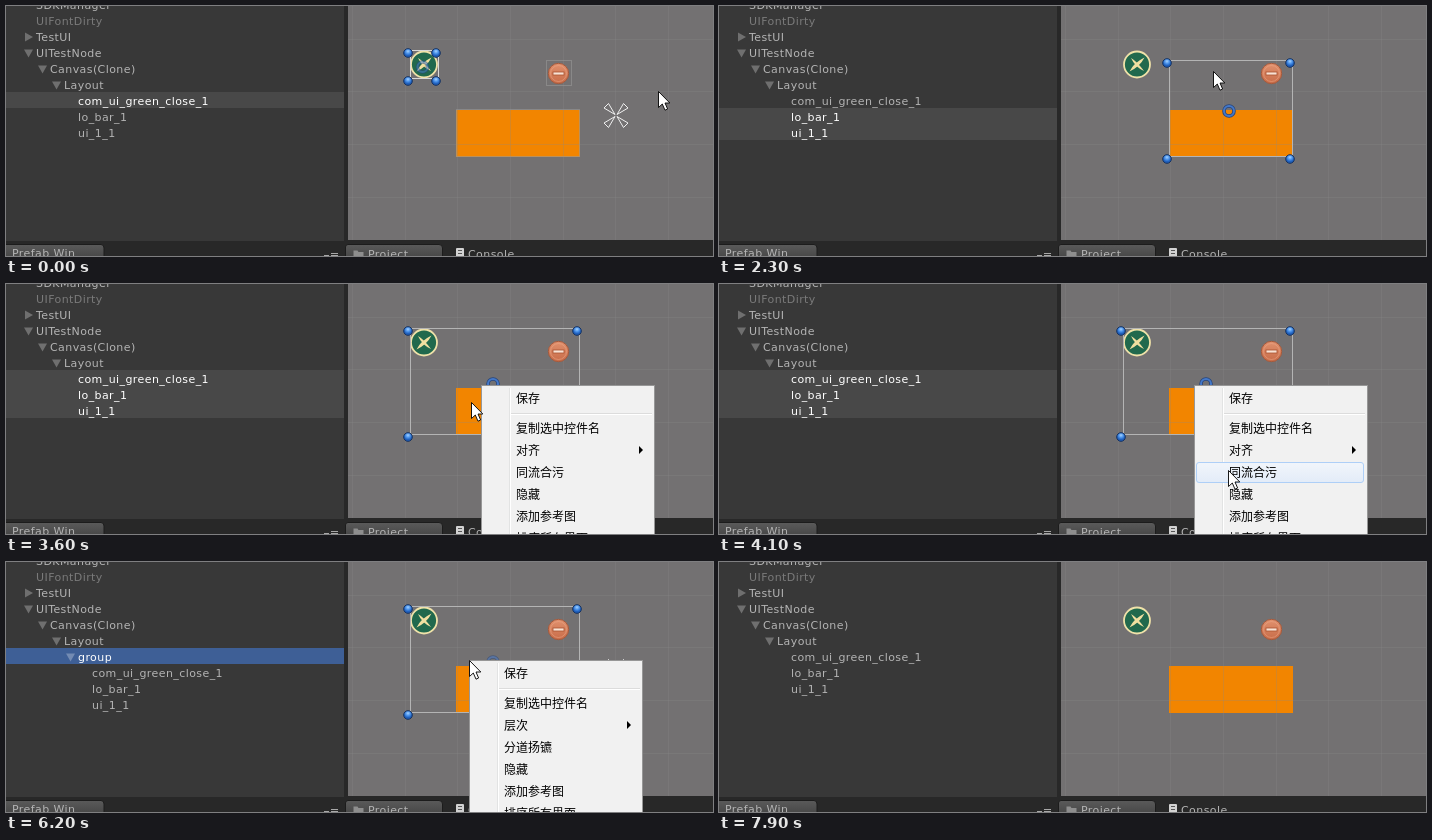
Write an HTML page that moves like this. It is 707 by 250 pixels and loops after 8800 ms.

```html
<!DOCTYPE html>
<html lang="zh">
<head>
<meta charset="utf-8">
<title>Grouping UI nodes</title>
<style>
html, body { margin: 0; width: 100%; height: 100%; overflow: hidden; background: #282828; }
svg { display: block; }
text { font: 11px "DejaVu Sans", sans-serif; letter-spacing: .42px; fill: #b4b4b4; white-space: pre; }
text.menu { font: 12px "Noto Sans CJK SC", "Noto Sans CJK", sans-serif; letter-spacing: 0; fill: #000; }
</style>
</head>
<body>
<svg id="stage" width="707" height="250" viewBox="0 0 707 250">
  <defs>
    <linearGradient id="tab" x2="0" y2="1"><stop stop-color="#5a5a5a"/><stop offset="1" stop-color="#484848"/></linearGradient>
    <linearGradient id="hover" x2="0" y2="1"><stop stop-color="#f1f5fb"/><stop offset="1" stop-color="#e3ecf8"/></linearGradient>
    <radialGradient id="knob" cy=".3"><stop stop-color="#a4d2ff"/><stop offset=".55" stop-color="#4a92ea"/><stop offset="1" stop-color="#2060bc"/></radialGradient>
    <linearGradient id="copper" x2="0" y2="1"><stop stop-color="#e1916e"/><stop offset="1" stop-color="#c86c48"/></linearGradient>
  </defs>
  <rect width="338" height="235" fill="#383838"/>
  <g id="tree"></g>
  <rect x="342" width="365" height="234" fill="#737172"/>
  <rect x="450" y="104" width="124" height="47" fill="#f28500"/>
  <path id="grid" fill="none" stroke="#8a8a8a" stroke-opacity=".27"/>
  <g transform="translate(418 58.5)">
    <circle r="13" fill="#21694d" stroke="#efe2a9" stroke-width="1.8"/>
    <path d="M-6-6.5Q0-3 7 6.5Q-2 2.5-6-6.5ZM7.5-7Q3 2-7.5 7Q-3-2 7.5-7Z" fill="#f0dfa0"/>
  </g>
  <g transform="translate(552.5 67.5)">
    <circle r="10.2" fill="url(#copper)" stroke="#a65a3c"/>
    <circle r="8" fill="none" stroke="#eda98a" stroke-opacity=".5"/>
    <rect x="-5.5" y="-1.5" width="11" height="3" fill="#f8e2d4" stroke="#a9502f" stroke-width=".8"/>
  </g>
  <g id="gizmo"></g>
  <g>
    <rect y="235" width="707" height="15" fill="#282828"/>
    <rect x="338" width="4" height="238" fill="#282828"/>
    <path d="M-2 251V238.5H95Q98 238.5 98 242V251M339.5 251V241Q339.5 238.5 342 238.5H433Q436.5 238.5 436.5 242V251" fill="url(#tab)" stroke="#1c1c1c"/>
    <text x="6" y="251">Prefab Win</text>
    <path d="M318 249.5h5M325 247.5h7M325 249.5h7" stroke="#a8a8a8"/>
    <path d="M347.5 251V244.5h4l1 1.5h5V251Z" fill="#8e8e8e"/>
    <text x="362" y="252">Project</text>
    <rect x="450" y="242" width="8" height="9" rx="1" fill="#d2d2d2"/>
    <path d="M452 244.5h4M452 247.5h4" stroke="#555"/>
    <text x="462" y="252">Console</text>
  </g>
  <g id="popup"></g>
  <path id="cursor" d="M.5.5V16.5L4.3 13L7 19.2L9.6 18L7 12H11.8Z" fill="#fff" stroke="#000" stroke-width=".9"/>
</svg>
<script>
const LOOP = 8800, STEP = 100;
const el = id => document.getElementById(id);

// Node bounds: left, top, right, bottom
const nodes = {
  com_ui_green_close_1: [404, 44, 432, 72],
  lo_bar_1: [450, 103, 573, 150],
  ui_1_1: [540, 54, 565, 79],
};
const names = Object.keys(nodes);
const [closeName, barName, minusName] = names;

// Pointer stops: time, x, y
const pointer = [
  [0, 652, 85], [300, 575, 150], [450, 500, 166], [600, 452, 138], [700, 462, 132], [900, 462, 132],
  [1500, 546, 124], [1800, 563, 73], [1900, 565, 69], [2000, 565, 69],
  [2600, 422, 60], [2700, 422, 60], [2900, 447, 88], [3100, 475, 101], [3400, 475, 101],
  [3600, 465, 118], [3800, 520, 164], [4100, 509, 186], [4200, 509, 186],
  [4500, 400, 120], [4800, 150, 62], [5000, 65, 92], [5200, 65, 92], [5500, 134, 104], [5600, 134, 104],
  [6100, 463, 98], [6300, 463, 98], [6600, 520, 160], [6900, 515, 186], [7300, 515, 186], [7900, 650, 256],
];

function pointerAt(t) {
  const next = pointer.findIndex(stop => stop[0] > t);
  if (next < 0) return pointer[pointer.length - 1].slice(1);
  const [t0, x0, y0] = pointer[next - 1], [t1, x1, y1] = pointer[next];
  const k = (t - t0) / (t1 - t0);
  return [x0 + (x1 - x0) * k, y0 + (y1 - y0) * k].map(Math.round);
}

function selectionAt(t) {
  if (t < 1000) return [closeName];
  if (t < 2100) return [barName];
  if (t < 2600) return [barName, minusName];
  return t < 7400 ? names : [];
}

const isGrouped = t => t >= 4300 && t < 7400;

function row(line, depth, label, { fold = '', color = '', back = '' } = {}) {
  const y = line * 16 - 1, x = 30 + depth * 14;
  const shape = fold === 'open' ? 'M-4.5-3.5h9L0 4.5Z' : 'M-3.5-4.5v9L4.5 0Z';
  return (back && `<rect y="${y - 9}" width="338" height="16" fill="${back}"/>`) +
    (fold && `<path d="${shape}" transform="translate(${x - 7.5} ${y})" fill="#fff" fill-opacity=".28"/>`) +
    `<text x="${x}" y="${y + 4}"${color && ` style="fill:${color}"`}>${label}</text>`;
}

function treeMarkup(t) {
  const open = { fold: 'open' };
  const rows = [
    row(0, 0, 'SDKManager'), row(1, 0, 'UIFontDirty', { color: '#7a7a7a' }), row(2, 0, 'TestUI', { fold: 'shut' }),
    row(3, 0, 'UITestNode', open), row(4, 1, 'Canvas(Clone)', open), row(5, 2, 'Layout', open),
  ];
  const selected = selectionAt(t);
  if (isGrouped(t)) {
    const expanded = t >= 5200;
    rows.push(row(6, 3, 'group', { fold: expanded ? 'open' : 'shut', color: '#fff', back: expanded ? '#3e5f96' : '#484848' }));
    if (expanded) names.forEach((name, i) => rows.push(row(7 + i, 4, name)));
  } else {
    names.forEach((name, i) => rows.push(row(6 + i, 3, name,
      selected.includes(name) ? { color: '#fff', back: '#484848' } : {})));
  }
  return rows.join('');
}

const outline = ([l, t, r, b], color) =>
  `<rect x="${l + .5}" y="${t + .5}" width="${r - l}" height="${b - t}" fill="none" stroke="${color}"/>`;

function gizmoMarkup(t) {
  const selected = selectionAt(t);
  if (!selected.length) return '';
  const bounds = [Math.min, Math.min, Math.max, Math.max]
    .map((pick, side) => pick(...selected.map(name => nodes[name][side])));
  const [l, top, r, b] = bounds;
  const single = selected.length === 1, anchored = single || isGrouped(t);
  let out = single ? names.map(name => outline(nodes[name], '#98989899')).join('') : '';
  out += outline(bounds, single ? '#d8d8d8' : '#b4b4b4');
  out += `<g transform="translate(${(l + r) / 2 - 1.5} ${(top + b) / 2 + 3})" fill="none" opacity="${anchored ? .55 : 1}">
    <circle r="5" stroke="#27457c" stroke-width="3.6"/><circle r="5" stroke="#4478c8" stroke-width="2"/></g>`;
  for (const x of [l, r]) for (const y of [top, b])
    out += `<circle cx="${x - 2}" cy="${y + 3}" r="4.3" fill="url(#knob)" stroke="#14305f"/>`;
  if (anchored)
    for (const turn of [0, 90, 180, 270])
      out += `<path d="M1 1L12 7.5L7.5 12Z" transform="translate(610 109.5) rotate(${turn})" fill="#737172" stroke="#f0f0f0"/>`;
  return out;
}

const panel = (x, y, w, h) =>
  `<rect x="${x + .5}" y="${y + .5}" width="${w - 1}" height="${h}" fill="#f1f1f1" stroke="#979797"/>
   <path d="M${x + 28.5} ${y + 3}v${h - 5}" stroke="#e2e3e3"/><path d="M${x + 29.5} ${y + 3}v${h - 5}" stroke="#fff"/>`;
const item = (x, y, label) => `<text class="menu" x="${x + 35}" y="${y + 4.5}">${label}</text>`;

function menuMarkup(x, y, labels, sub, subOpen, [px, py]) {
  const itemY = i => y + (i ? 21 + i * 22 : 13);
  const active = subOpen ? 2 : labels.findIndex((_, i) => px > x + 3 && Math.abs(py - itemY(i)) < 11);
  let out = panel(x, y, 174, 200) +
    `<path d="M${x + 30} ${y + 28.5}h141" stroke="#dcdcdc"/><path d="M${x + 30} ${y + 29.5}h141" stroke="#fff"/>`;
  if (active >= 0)
    out += `<rect x="${x + 2.5}" y="${itemY(active) - 9.5}" width="167" height="20" rx="2.5" fill="url(#hover)" stroke="#aecff7"/>`;
  out += labels.map((label, i) => item(x, itemY(i), label)).join('') +
    `<path d="M${x + 158} ${itemY(2) - 4}v8l4-4Z"/>`;
  if (subOpen) {
    const top = itemY(2) - 13;
    out += panel(x + 169, top, 120, sub.length * 22 + 5) +
      sub.map((label, i) => item(x + 169, top + 14 + i * 22, label)).join('');
  }
  return out;
}

const menuLabels = (third, fourth) => ['保存', '复制选中控件名', third, fourth, '隐藏', '添加参考图', '排序所有界面'];

function popupMarkup(t, at) {
  if (t >= 3400 && t < 4300)
    return menuMarkup(475, 101, menuLabels('对齐', '同流合污'), ['左对齐', '右对齐', '上对齐', '下对齐'], t >= 3800 && t < 4000, at);
  if (t >= 6200 && t < 7400)
    return menuMarkup(463, 98, menuLabels('层次', '分道扬镳'), ['最上层', '最下层', '上移'], t >= 6600 && t < 6800, at);
  return '';
}

function render(t) {
  const at = pointerAt(t);
  el('tree').innerHTML = treeMarkup(t);
  el('gizmo').innerHTML = gizmoMarkup(t);
  el('popup').innerHTML = popupMarkup(t, at);
  el('cursor').setAttribute('transform', `translate(${at})`);
  el('cursor').setAttribute('visibility', t < 7900 ? 'visible' : 'hidden');
}

let grid = '';
for (let i = -3; i < 4; i++) grid += `M${Math.floor(504.5 + i * 52.7) + .5} 0V234`;
for (let i = -2; i < 2; i++) grid += `M342 ${Math.floor(138.5 + i * 52.7) + .5}H707`;
el('grid').setAttribute('d', grid);

const start = performance.now();
let shown = -1;
function tick() {
  const t = Math.floor(((performance.now() - start) % LOOP) / STEP) * STEP;
  if (t !== shown) render(shown = t);
  requestAnimationFrame(tick);
}
tick();
</script>
</body>
</html>
```
